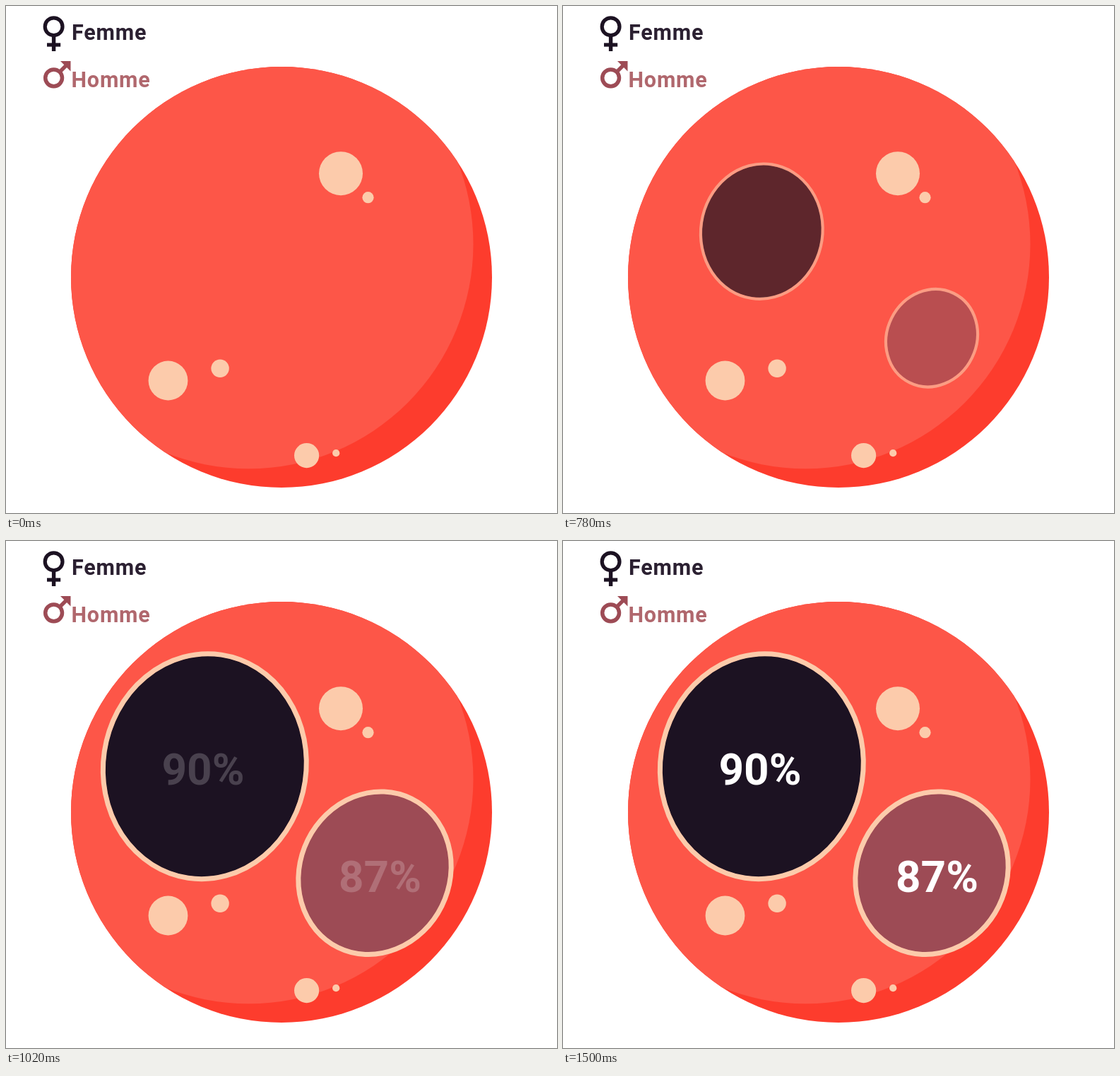
Animation, 780 px wide and 718 px high, one loop 2.7 s. Source, as an HTML page with a canvas:

```html
<!DOCTYPE html>
<html lang="fr">
<head>
<meta charset="utf-8">
<title>Femme / Homme</title>
<style>
  html, body { margin: 0; width: 100%; height: 100%; overflow: hidden; background: #fff; }
  canvas { display: block; }
</style>
</head>
<body>
<canvas id="stage" width="780" height="718"></canvas>
<script>
const ctx = document.getElementById('stage').getContext('2d');
const LOOP = 2700, STEP = 30;
const INK = '#1c1222', ROSE = '#9d4b55', CREAM = '#fccbab';
const clamp = v => Math.max(0, Math.min(1, v));

const dots = [
  [474, 237.2, 31], [512.5, 271.2, 8.1], [229.5, 530.5, 27.9],
  [303.1, 513.2, 12.7], [425.6, 636.6, 17.6], [467.2, 633.2, 5.1]
];
const cells = [
  { x: 281.3, y: 319.2, rx: 143.6, ry: 159.8, tilt: 8.5, fill: INK, text: '90%', tx: 222.5, ty: 345 },
  { x: 522, y: 470.2, rx: 105.8, ry: 117.5, tilt: 26.3, fill: ROSE, text: '87%', tx: 473, ty: 497 }
];

function disc(x, y, r, color) {
  ctx.fillStyle = color;
  ctx.beginPath();
  ctx.arc(x, y, r, 0, 2 * Math.PI);
  ctx.fill();
}

function ring(x, y, r, width, color) {
  ctx.strokeStyle = color;
  ctx.lineWidth = width;
  ctx.beginPath();
  ctx.arc(x, y, r, 0, 2 * Math.PI);
  ctx.stroke();
}

// Places text by the left edge of its ink.
function label(text, x, y, size, spacing, color) {
  ctx.font = `700 ${size}px Roboto, sans-serif`;
  ctx.letterSpacing = spacing + 'px';
  ctx.fillStyle = color;
  ctx.fillText(text, x + ctx.measureText(text).actualBoundingBoxLeft, y);
}

function drawLegend() {
  ring(67.6, 29.2, 12.4, 5.2, INK);
  ctx.fillStyle = INK;
  ctx.fillRect(64.9, 43, 5.4, 21);
  ctx.fillRect(58, 52.4, 19.2, 5.2);
  label('Femme', 94, 47.5, 30.5, 0.8, '#2b2031');

  ring(67.6, 101.8, 11.9, 5.5, ROSE);
  ctx.beginPath();
  ctx.moveTo(75.5, 93.9);
  ctx.lineTo(86, 83.4);
  ctx.stroke();
  ctx.fillStyle = ROSE;
  ctx.beginPath();
  ctx.moveTo(77, 78);
  ctx.lineTo(91.5, 78);
  ctx.lineTo(91.5, 92.5);
  ctx.fill();
  label('Homme', 93.5, 115, 30.5, 0.8, '#b0676d');
}

function drawPlanet() {
  disc(390, 384, 298, '#fd3c2d');
  ctx.save();
  ctx.beginPath();
  ctx.arc(390, 384, 298, 0, 2 * Math.PI);
  ctx.clip();
  disc(343.5, 337.3, 318, '#fd5648');
  ctx.restore();
  dots.forEach(([x, y, r]) => disc(x, y, r, CREAM));
}

function drawCell(c, grow, fade) {
  ctx.save();
  ctx.translate(c.x, c.y);
  ctx.rotate(c.tilt * Math.PI / 180);
  ctx.scale(grow, grow);
  ctx.globalAlpha = clamp(grow * 1.17);
  ctx.fillStyle = c.fill;
  ctx.beginPath();
  ctx.ellipse(0, 0, c.rx - 3, c.ry - 3, 0, 0, 2 * Math.PI);
  ctx.fill();
  ctx.globalAlpha = grow;
  ctx.strokeStyle = CREAM;
  ctx.lineWidth = 7;
  ctx.beginPath();
  ctx.ellipse(0, 0, c.rx, c.ry, 0, 0, 2 * Math.PI);
  ctx.stroke();
  ctx.restore();

  ctx.globalAlpha = fade;
  label(c.text, c.tx, c.ty, 62, 0, '#fff');
  ctx.globalAlpha = 1;
}

function draw(ms) {
  const t = Math.floor((ms % LOOP + 0.01) / STEP) * STEP;
  const grow = clamp((t - 600) / 300);
  const fade = clamp((t - 900) / 600);
  ctx.fillStyle = '#fff';
  ctx.fillRect(0, 0, 780, 718);
  drawPlanet();
  drawLegend();
  if (grow > 0) cells.forEach(c => drawCell(c, grow, fade));
}

const start = performance.now();
function tick() {
  draw(performance.now() - start);
  requestAnimationFrame(tick);
}
tick();
</script>
</body>
</html>
```
